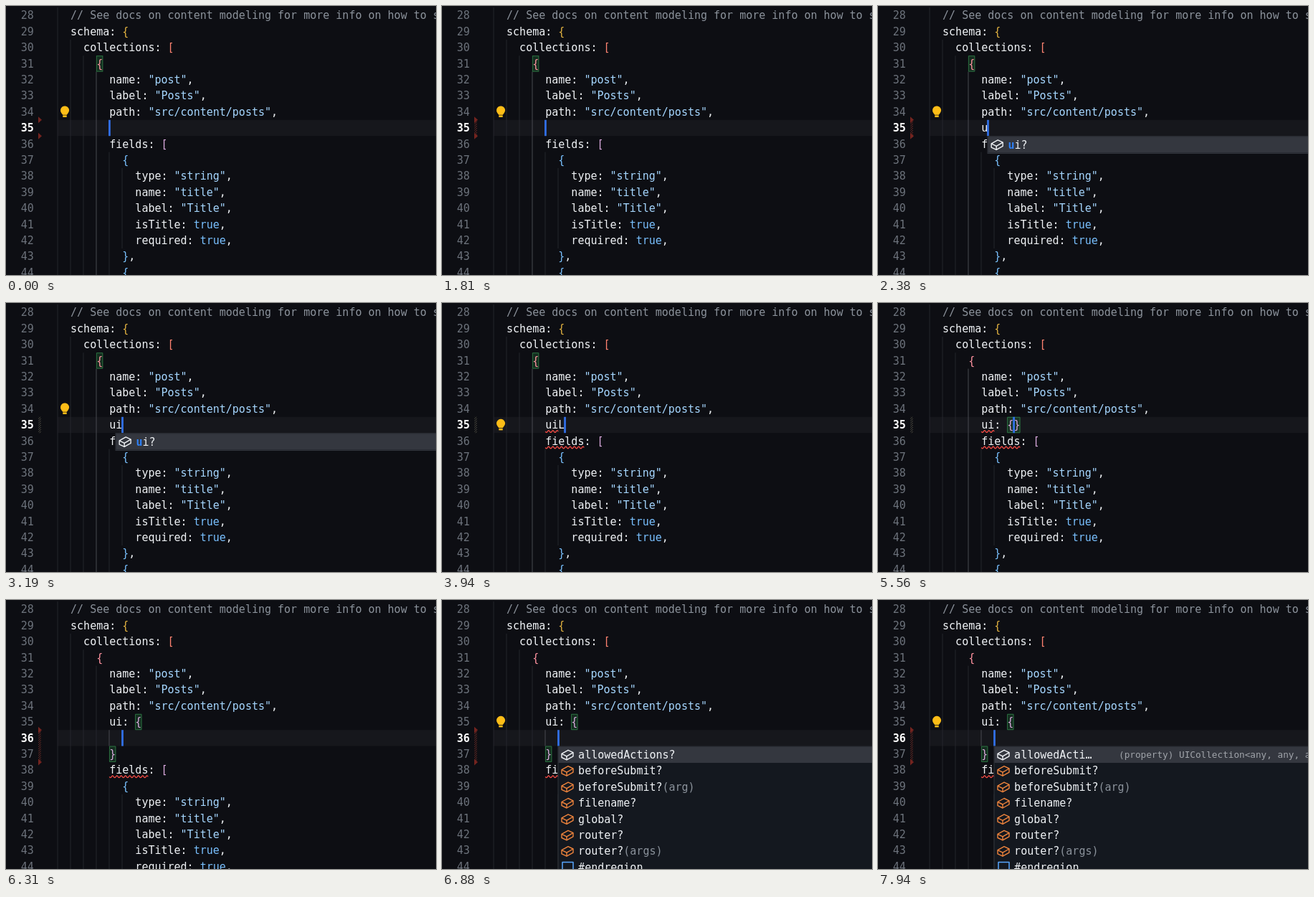
An HTML page with a canvas for the animation above (8000 ms loop, 600x375 px).

```html
<!DOCTYPE html>
<html lang="en">
<head>
<meta charset="utf-8">
<title>Editor typing</title>
<style>
html, body { margin: 0; width: 100%; height: 100%; overflow: hidden; background: #0d0e13; }
canvas { display: block; width: 600px; height: 375px; }
</style>
</head>
<body>
<canvas id="stage"></canvas>
<script>
const W = 600, H = 375, LOOP = 8000;
const FIRST = 28, ROW = 22.4, CHAR = 9.03, LEFT = 72;
const MONO = '"DejaVu Sans Mono", monospace';
const CODE = '15px ' + MONO;
const C = {
  bg: '#0d0e13', band: '#16171c', text: '#f0f3f6', comment: '#8b929b', number: '#6c727b',
  string: '#a5d6ff', literal: '#79c0ff', cursor: '#316fe6', error: '#f04a43',
  popup: '#14181f', picked: '#34373f', border: '#30343b', orange: '#ee843d'
};
const BRACKETS = ['#e3b341', '#ff8270', '#ff929f', '#d9a8dd', '#79c0ff'];

const HEAD = [
  '  // See docs on content modeling for more info on how to setup new content models',
  '  schema: {',
  '    collections: [',
  '      {',
  '        name: "post",',
  '        label: "Posts",',
  '        path: "src/content/posts",'
];
const TAIL = [
  '        fields: [',
  '          {',
  '            type: "string",',
  '            name: "title",',
  '            label: "Title",',
  '            isTitle: true,',
  '            required: true,',
  '          },',
  '          {'
];
const OPTIONS = ['allowedActions?', 'beforeSubmit?', 'beforeSubmit?(arg)', 'filename?',
  'global?', 'router?', 'router?(args)', '#endregion'];

// Typed text on line 35, from each start time on
const TYPED = [[0, ''], [2190, 'u'], [2520, 'ui'], [3600, 'uiL'], [4260, 'ui'],
  [4560, 'ui:'], [4800, 'ui: '], [5200, 'ui: {}']];
const T = { hatch: 500, popup: 2250, errors: 3240, clean: 2900, noPopup: 3600,
  noBulb: 4260, braces: 5200, enter: 6050, bulb: 6560, list: 6700, detail: 7150 };

const canvas = document.getElementById('stage');
const ctx = canvas.getContext('2d');
const dpr = window.devicePixelRatio || 1;
canvas.width = W * dpr;
canvas.height = H * dpr;

const colX = col => LEFT + col * CHAR;
const rowY = line => 2 + (line - FIRST) * ROW;
const baseline = y => y + 16.3;

function fill(x, y, w, h, color) {
  ctx.fillStyle = color;
  ctx.fillRect(x, y, w, h);
}

function put(str, x, y, color, font = CODE) {
  ctx.font = font;
  ctx.fillStyle = color;
  ctx.fillText(str, x, y);
}

function path(points, color, width = 1.4, close = false) {
  ctx.beginPath();
  points.forEach(([x, y]) => ctx.lineTo(x, y));
  if (close) ctx.closePath();
  ctx.strokeStyle = color;
  ctx.lineWidth = width;
  ctx.stroke();
}

function drawCode(lines) {
  let depth = 0;
  lines.forEach((line, i) => {
    const y = baseline(rowY(FIRST + i));
    if (line.trim().startsWith('//')) {
      put(line.trim(), colX(2), y, C.comment);
      return;
    }
    for (const m of line.matchAll(/"[^"]*"|\btrue\b|[{}\[\]]|[^"{}\[\]\s,]+|,/g)) {
      const s = m[0];
      let color = C.text;
      if (s[0] === '"') color = C.string;
      else if (s === 'true') color = C.literal;
      else if (/[{[]/.test(s)) color = BRACKETS[depth++];
      else if (/[}\]]/.test(s)) color = BRACKETS[--depth];
      put(s, colX(m.index), y, color);
    }
  });
}

function drawNumbers(active) {
  for (let n = FIRST; n <= 44; n++) {
    const on = n === active;
    put(String(n), 20.8, baseline(rowY(n)), on ? '#ffffff' : C.number, (on ? 'bold ' : '') + CODE);
  }
}

function guide(col, from, to = 45, active = false) {
  fill(Math.round(colX(col)) - 0.5, rowY(from), 1, (to - from) * ROW, active ? '#484a50' : '#24262c');
}

function drawGuides(split) {
  const shift = split ? 2 : 0;
  guide(0, 28);
  guide(2, 30);
  guide(4, 31);
  guide(6, 32, 45, !split);
  if (split) guide(8, 36, 37, true);
  guide(8, 37 + shift);
  guide(10, 38 + shift, 43 + shift);
}

function matchBox(col, line) {
  const x = colX(col), y = rowY(line);
  fill(x, y, CHAR, ROW, 'rgba(46,150,75,0.22)');
  ctx.strokeStyle = '#2c7040';
  ctx.lineWidth = 1;
  ctx.strokeRect(x + 0.2, y + 0.5, CHAR - 0.6, ROW - 1);
}

function squiggle(col, line, chars) {
  const x = colX(col), y = rowY(line) + 20.3, points = [];
  for (let d = 0; d <= chars * CHAR; d += 0.5) {
    points.push([x + d, y + 1.4 * Math.sin(d * Math.PI / 3)]);
  }
  path(points, C.error, 1.3);
}

function arrow(y) {
  ctx.fillStyle = '#74241f';
  ctx.beginPath();
  ctx.moveTo(45, y - 4.5);
  ctx.lineTo(50, y);
  ctx.lineTo(45, y + 4.5);
  ctx.fill();
}

function hatch(y, h, color) {
  ctx.save();
  ctx.beginPath();
  ctx.rect(45, y, 4, h);
  ctx.clip();
  for (let d = -4; d < h + 4; d += 3) path([[45, y + d + 4], [49, y + d]], color, 1);
  ctx.restore();
}

function drawGutter(t, split) {
  const y = rowY(split ? 36 : 35), h = split ? 2 * ROW : ROW;
  const changed = split || t < T.clean;
  if (t >= T.hatch) hatch(y, h + (changed ? 2 : 0), changed ? '#6c2a25' : '#4b4a40');
  if (changed) {
    arrow(y);
    arrow(y + h);
  }
}

function bulb(line) {
  const y = rowY(line) + 9;
  ctx.fillStyle = '#fdbd17';
  ctx.beginPath();
  ctx.arc(82, y, 6, Math.PI * 0.8, Math.PI * 0.2);
  ctx.lineTo(84.8, y + 6.3);
  ctx.lineTo(79.2, y + 6.3);
  ctx.fill();
  fill(79.3, y + 7, 5.4, 2.6, '#fdbd17');
}

function cube(x, y, color) {
  const at = pts => pts.map(([a, b]) => [x + a, y + b]);
  ctx.lineJoin = 'round';
  path(at([[-8, -1.5], [1, -6.5], [8, -3.2], [8, 2], [-1, 7], [-8, 3.7]]), color, 1.4, true);
  path(at([[-8, -1.5], [-1, 2], [8, -3.2]]), color);
  path(at([[-1, 2], [-1, 7]]), color);
}

function popup(col, line, count) {
  const x = colX(col) - 0.8, y = rowY(line);
  fill(x, y, W - x, count * ROW + 2.4, C.border);
  fill(x + 1, y + 1, W - x, count * ROW + 0.4, C.popup);
  fill(x + 1, y + 1, W - x, ROW, C.picked);
  return { x, y: y + 1 };
}

function shortPopup() {
  const { x, y } = popup(9, 36, 1);
  cube(x + 13.7, y + 11.2, C.text);
  put('u', x + 29, baseline(y), '#2f81f7', 'bold ' + CODE);
  put('i?', x + 29 + CHAR, baseline(y), C.text);
}

function listPopup(detail) {
  const { x, y } = popup(10, 37, OPTIONS.length);
  OPTIONS.forEach((option, i) => {
    const itemY = y + i * ROW, mid = itemY + 11.2;
    const [name, args] = option.split('(');
    const label = i === 0 && detail ? name.slice(0, 11) + '…' : name;
    if (name[0] === '#') {
      ctx.strokeStyle = '#58a6ff';
      ctx.lineWidth = 1.5;
      ctx.strokeRect(x + 6.5, mid - 7, 15, 14);
    } else {
      cube(x + 13.5, mid, i ? C.orange : C.text);
    }
    put(label, x + 28.6, baseline(itemY), C.text);
    if (args) put('(' + args, x + 28.6 + name.length * CHAR, baseline(itemY), C.comment);
  });
  if (detail) {
    put('(property) UICollection<any, any, any>', 336, baseline(y) - 0.8, '#a0a4aa', '12.7px ' + MONO);
  }
}

function draw(t) {
  const split = t >= T.enter;
  const typed = TYPED.filter(([from]) => from <= t).pop()[1];
  const active = split ? 36 : 35;
  const edited = split ? ['        ui: {', '', '        }'] : ['        ' + typed];
  const cursorCol = split ? 10 : 8 + typed.length - (typed.endsWith('}') ? 1 : 0);

  ctx.setTransform(dpr, 0, 0, dpr, 0, 0);
  fill(0, 0, W, H, C.bg);
  fill(LEFT, rowY(active), W - LEFT, ROW, C.band);
  drawGuides(split);
  drawGutter(t, split);

  if (split) {
    matchBox(12, 35);
    matchBox(8, 37);
  } else if (t >= T.braces) {
    matchBox(12, 35);
    matchBox(13, 35);
  } else {
    matchBox(6, 31);
  }

  drawNumbers(active);
  drawCode([...HEAD, ...edited, ...TAIL].slice(0, 17));

  if (t >= T.errors) {
    if (!split) squiggle(8, 35, 2);
    squiggle(8, split ? 38 : 36, 6);
  }
  if (t < T.errors) bulb(34);
  else if (t < T.noBulb || t >= T.bulb) bulb(35);

  fill(colX(cursorCol) - 1.2, rowY(active), 2.8, ROW, C.cursor);
  if (t >= T.popup && t < T.noPopup) shortPopup();
  if (t >= T.list) listPopup(t >= T.detail);
}

const began = performance.now();
function tick() {
  draw(Math.max(0, performance.now() - began) % LOOP);
  requestAnimationFrame(tick);
}
tick();
</script>
</body>
</html>
```
